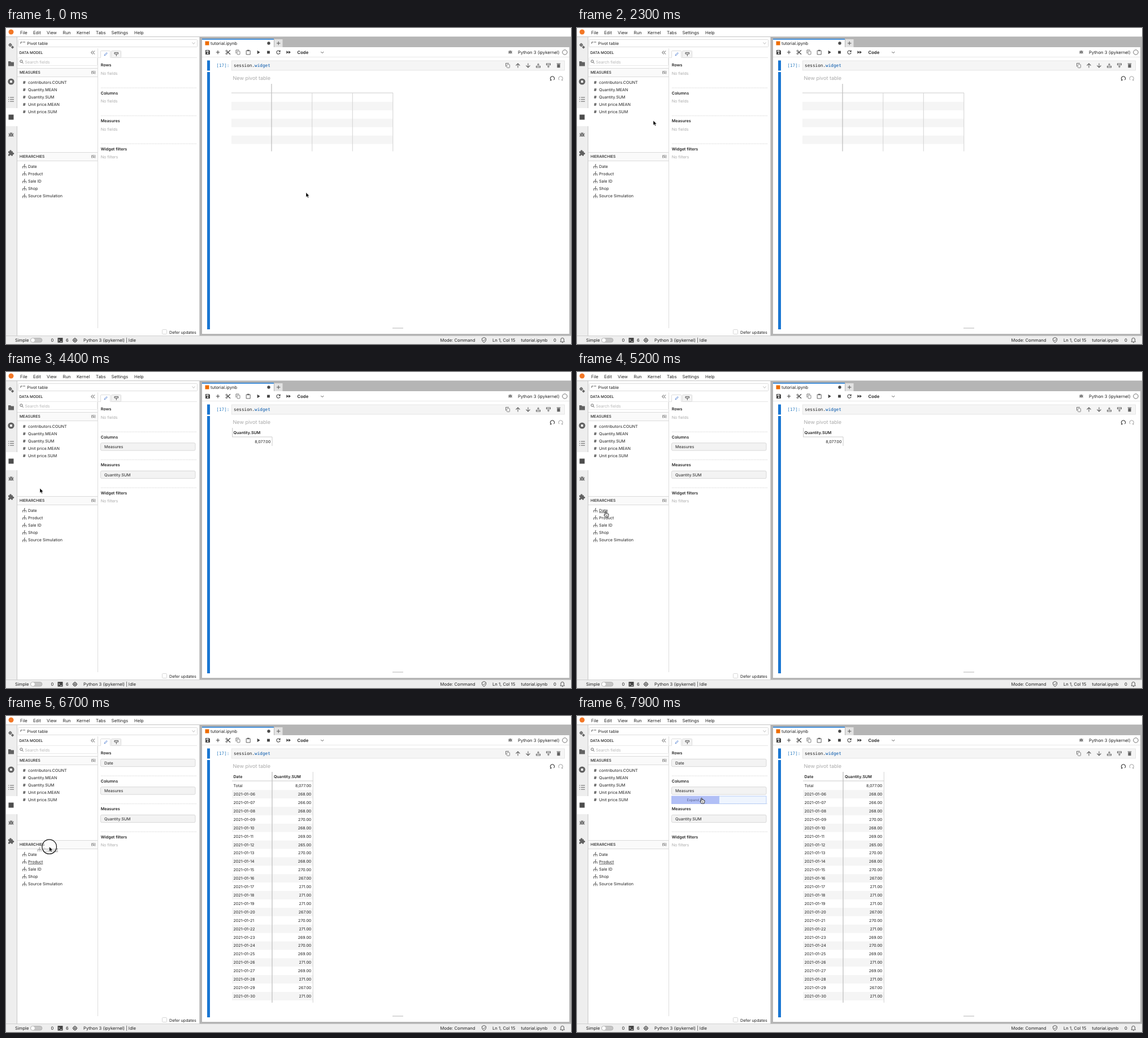
These frames come from a looping animation (1000 by 560 pixels, 8 s). An HTML page:

```html
<!DOCTYPE html>
<html lang="en">
<head>
<meta charset="utf-8">
<title>Pivot table</title>
<style>
html, body { margin: 0; width: 100%; height: 100%; overflow: hidden; background: #fff; }
svg { display: block; width: 100vw; height: 100vh; font-family: Inter, sans-serif; text-rendering: geometricPrecision; }
.mono { font-family: "DejaVu Sans Mono", monospace; }
.hover { text-decoration: underline; }
</style>
</head>
<body>
<svg id="stage" viewBox="0 0 1000 560"></svg>
<script>
const STEP = 100, LOOP = 8000;
const INK = '#212121', GREY = '#616161', PALE = '#aaa', LINE = '#d4d4d4', BLUE = '#1976d2';

// Markup helpers; text is placed by its vertical middle
const text = (x, y, s, size = 7.15, fill = INK, more = '') =>
  `<text x="${x}" y="${y + size * .36}" font-size="${size}" fill="${fill}" ${more}>${s}</text>`;
const bold = (x, y, s, size = 7.1) => text(x, y, s, size, INK, 'font-weight="600"');
const rect = (x, y, w, h, fill, more = '') =>
  `<rect x="${x}" y="${y}" width="${w}" height="${h}" fill="${fill}" ${more}/>`;
const box = (x, y, w, h, fill = '#fff', stroke = LINE, r = 1) =>
  rect(x + .5, y + .5, w - 1, h - 1, fill, `stroke="${stroke}" stroke-width=".8" rx="${r}"`);
const line = (d, stroke = GREY, w = 1, more = '') =>
  `<path d="${d}" fill="none" stroke="${stroke}" stroke-width="${w}" ${more}/>`;
const fill = (d, color = GREY) => `<path d="${d}" fill="${color}"/>`;
const disc = (x, y, r, color, more = '') => `<circle cx="${x}" cy="${y}" r="${r}" fill="${color}" ${more}/>`;
const ring = (x, y, r, color = GREY, w = 1) => disc(x, y, r, 'none', `stroke="${color}" stroke-width="${w}"`);
const at = (x, y, s) => `<g transform="translate(${x} ${y})">${s}</g>`;
const group = (id, s) => `<g id="${id}">${s}</g>`;

// Icons, drawn around 0,0
const gear = r => ring(0, 0, r, GREY, 1.3) + line(`M${-r - 1.3} 0H${r + 1.3}M0 ${-r - 1.3}V${r + 1.3}`, GREY, .8);
const bug = s => `<g transform="scale(${s})">` + disc(0, 0, 2.6, GREY) +
  line('M-4 -2.5 4 2.5M-4 2.5 4 -2.5M-4 0H4M-1.5 -4 0 -2 1.5 -4', GREY, 1) + line('M-1 -.7H1M-1 .8H1', '#fff', .7) + '</g>';
const copy = box(-2, -2.5, 6, 7, '#fff', GREY) + line('M-3.5 2V-4H2', GREY, .9);
const tree = line('M.5 3.5V0H6.5V3.5M3.5 3.5V-3.5H5', '#444', .8);
const arrowUp = line('M0 4V-3.5M-3.5 0 0 -3.5 3.5 0', GREY, 1.1);
const insert = rect(-3.5, 1, 7, 2.5, 'none', `stroke="${GREY}"`) + line('M0 0V-4M-2 -2H2', GREY, .9);
const reload = c => line('M2.5 3A3.6 3.6 0 1 0 -2.5 3', c, 1.1) + fill('M-4.5 4.2H-1.6V1.4Z', c);

const measures = ['contributors.COUNT', 'Quantity.MEAN', 'Quantity.SUM', 'Unit price.MEAN', 'Unit price.SUM'];
const hierarchies = ['Date', 'Product', 'Sale ID', 'Shop', 'Source Simulation'];
const items = [...measures.map((name, i) => ({ name, y: 96.2 + i * 13.1 })),
  ...hierarchies.map((name, i) => ({ name, y: 245.2 + i * 13.15, tree: true }))];

function menuAndSidebar() {
  const menu = [[25, 'File'], [48, 'Edit'], [72, 'View'], [100.5, 'Run'], [125, 'Kernel'], [159, 'Tabs'], [186.5, 'Settings'], [227, 'Help']];
  return disc(9, 7, 4.5, '#f37726') + menu.map(([x, s]) => text(x, 8, s, 7.7)).join('') +
    rect(0, 15, 1000, 1, '#c4c4c4') +
    rect(0, 16, 19, 530, '#eee') + rect(19, 16, 1, 530, '#c8c8c8') + rect(0, 142, 20, 32, '#fff') +
    at(7.5, 30, gear(2)) + at(11.5, 34, gear(1.3)) +
    fill('M4 59H8L9.3 60.5H14V67.5H4Z') +
    disc(9, 95, 5.6, GREY) + rect(7, 93, 4, 4, '#eee') +
    line('M7 123H14M7 126.5H14M7 130H14M4 123H5.5M4 126.5H5.5M4 130H5.5', GREY, 1.2) +
    rect(4.5, 153.5, 9, 9, '#4d4d4d') +
    at(9, 189.5, bug(1.1)) +
    rect(4, 218.5, 8, 8, GREY) + disc(8, 218, 1.8, GREY) + disc(12.5, 222.5, 1.8, GREY) + disc(4.3, 222.5, 1.2, '#eee') + disc(8, 226.3, 1.2, '#eee');
}

function fieldPanel() {
  const header = (y, s) => rect(20, y, 142, 15, '#fafafa') + line(`M20 ${y + .5}H162M20 ${y + 15.5}H162`, LINE, .8) +
    text(24, y + 8, s, 6.7, INK, 'font-weight="500"') + text(150.5, y + 8, '(5)', 6.2);
  const sections = ['Rows', 'Columns', 'Measures', 'Widget filters'];
  return box(21, 20, 318, 14) + line('M26 28V25H29M30 25H34', GREY, 1) + text(37.5, 27.2, 'Pivot table', 7.35) +
    line('M329.5 25.5 332 28.5 334.5 25.5', PALE, .8) +
    text(23.5, 43.5, 'DATA MODEL', 6.5, INK, 'font-weight="500"') +
    line('M153.5 40.5 150.8 43.5 153.5 46.5M156.8 40.5 154.1 43.5 156.8 46.5', '#333', .9) +
    box(21, 52, 141, 15, '#fff', '#e4e4e4') + ring(27, 59, 2.2, '#555', .9) + line('M28.6 60.7 30.6 62.8', '#555') +
    text(33.5, 60, 'Search fields', 7.15, '#b5b5b5') +
    line('M162.5 36V532', '#ddd') + header(71, 'MEASURES') + header(220, 'HIERARCHIES') +
    items.map(o => (o.tree ? at(29, o.y, tree) : text(30, o.y, '#', 7.2, INK, 'font-weight="600"')) +
      text(39, o.y, o.name, 7.15, INK, 'class="item"')).join('') +
    line('M163 52.5H338', '#e0e0e0', .8) + box(167, 40, 18, 13) + rect(168, 52, 16, 1.2, '#fff') + box(186, 40, 18, 13, '#f3f3f3') +
    line('M174 49 174.6 47 178 43.5 179.2 44.7 175.8 48.4Z', '#4a7ad0', .8) +
    line('M192 43.5H198.5V46H192ZM195.3 46V50', '#555', 1) +
    sections.map((s, i) => bold(167.7, 65.8 + i * 49.5, s) +
      (i ? line(`M168 ${56.6 + i * 49.5}H338`, '#d0d0d0', .8, 'stroke-dasharray="1.5 1"') : '')).join('') +
    text(167.7, 228.7, 'No filters', 7.1, PALE) +
    box(276, 534, 9, 9, '#fff', '#ccc') + text(289, 539.4, 'Defer updates', 7.15);
}

function notebook() {
  const icon = (x, s) => at(x, 43, s), cell = (x, s) => at(x, 66.5, s);
  return rect(342, 16, 658, 530, '#b5b5b5') + rect(342, 16, 1, 530, '#d0d0d0') + rect(347, 34, 650, 508, '#fff') +
    rect(347, 19, 127, 16, '#fff') + rect(347, 19, 127, 1.6, BLUE) + rect(475, 20, 14.5, 14, '#e3e3e3') +
    rect(352.5, 23.5, 7, 7, '#ef6c00') + text(362, 27.2, 'tutorial.ipynb', 7.7) + disc(465, 27, 2.7, '#4a4a4a') +
    line('M479 27H485.5M482.2 23.8V30.2', '#555') + rect(347, 51, 650, .8, '#e2e2e2') +
    icon(357, fill('M-4 -4H2.5L4 -2.5V4H-4Z', '#444') + rect(-2.5, -3, 4, 2, '#fff') + disc(0, 1.5, 1.3, '#fff')) +
    icon(375, line('M-3.2 0H3.2M0 -3.2V3.2', '#444', 1.1)) +
    icon(393, ring(-2.6, -2.4, 1.3, '#444') + ring(-2.6, 2.4, 1.3, '#444') + line('M-1.7 -1.5 4 3.7M-1.7 1.5 4 -3.7', '#444', 1.2)) +
    icon(410.5, copy) +
    icon(428.7, line('M-3.5 -3H3.5V4H-3.5Z', GREY) + rect(-1.8, -4.3, 3.6, 2.4, GREY)) +
    icon(446.7, fill('M-2 -3.2 3 0-2 3.2Z', '#444')) + icon(464.5, rect(-2.4, -2.4, 4.8, 4.8, '#444')) +
    icon(482, line('M2.2 -2.2A3.1 3.1 0 1 0 3.1 .8', '#444', 1.1) + fill('M3.7 -4V-.5H.2Z', '#444')) +
    icon(500, fill('M-3.6 -2.7 .2 0-3.6 2.7ZM.2 -2.7 4 0 .2 2.7Z', '#444')) +
    bold(515.5, 43.2, 'Code', 7.7) + line('M557.3 42 559.8 44.5 562.3 42', '#444', .9) +
    icon(892.5, bug(.85)) + text(906, 43.2, 'Python 3 (ipykernel)', 7.7) + ring(989, 43, 4.2, GREY, .9) +
    rect(356, 57.5, 5, 18, BLUE) + rect(356, 78, 5, 456, BLUE, 'id="bar"') +
    text(372.3, 66.7, '[17]:', 7.7, '#307fc1', 'class="mono"') + box(399, 57.5, 590, 18, '#f5f5f5', '#e0e0e0', 0) +
    text(403, 66.5, 'session.<tspan fill="#0055aa">widget</tspan>', 7.7, INK, 'class="mono"') +
    cell(888, copy) + cell(906, arrowUp) + cell(924, `<g transform="scale(1 -1)">${arrowUp}</g>`) +
    cell(942, insert) + cell(960, `<g transform="scale(1 -1)">${insert}</g>`) +
    cell(978, rect(-2.6, -2.2, 5.2, 6, GREY) + rect(-3.3, -3.9, 6.6, 1.1, GREY)) +
    text(401.5, 88.8, 'New pivot table', 9.05, PALE) +
    at(967, 89, reload('#333')) + at(981.7, 89, `<g transform="scale(-1 1)">${reload('#aaa')}</g>`) +
    rect(684, 531, 19, 1.6, '#d0d0d0');
}

function statusBar() {
  return rect(0, 545.5, 1000, 14.5, '#eee') + rect(0, 545, 1000, .8, '#c8c8c8') + text(16, 553, 'Simple', 7.65) +
    box(43, 549, 21.5, 8.5, '#c4c4c4', '#aaa', 4) + disc(47.5, 553.2, 3.8, '#fff', 'stroke="#aaa" stroke-width=".6"') +
    text(79.5, 553, '0', 7.65) + rect(91.5, 549, 9, 8.5, '#444') + line('M93 551.5 95 553.2 93 555M96 555.5H99', '#fff', .8) +
    text(106, 553, '6', 7.65) + at(122, 553.2, ring(0, 0, 3, '#444', 1.1) + rect(-1.2, -1.2, 2.4, 2.4, '#444') + line('M-4.4 0H-3M3 0H4.4M0 -4.4V-3M0 3V4.4', '#444')) +
    text(137, 553, 'Python 3 (ipykernel) | Idle', 7.65) + text(768.5, 553, 'Mode: Command', 7.65) +
    line('M846 548.5 849.5 550V553Q849 556 846 557.5 843 556 842.5 553V550ZM844.3 553 845.6 554.3 848 551.6', '#444', .9) +
    text(861, 553, 'Ln 1, Col 15', 7.65) + text(911.5, 553, 'tutorial.ipynb', 7.65) + text(969, 553, '0', 7.65) +
    line('M981 556H988.5L987.5 554.5V552A2.7 2.7 0 0 0 982 552V554.5ZM984 557.5H985.8', '#444', .9);
}

const chip = (y, s) => box(167, y - 7.2, 168.5, 14.4, '#f3f3f3', '#d0d0d0', 2) + text(174, y, s);
const none = y => text(167.7, y, 'No fields', 7.1, PALE);
const right = 'text-anchor="end"';
const PITCH = 14.91;

function emptyTable() {
  return [1, 3, 5].map(i => rect(399, 116 + i * PITCH, 286, PITCH, '#f5f5f5')).join('') +
    line('M399 115H685', '#ccc') + line('M470 99V218.5', '#c4c4c4', 1.4) +
    line('M541.8 115V218.5M613.3 115V218.5M684.8 115V218.5', '#d2d2d2');
}

function dateTable() {
  const sums = [...'3135340535266625645464626'].map(d => 265 + +d);
  return sums.map((n, i) => {
    const y = 123.6 + (i + 1) * PITCH;
    return (i % 2 ? '' : rect(400, y - 7.4, 143, PITCH, '#f5f5f5')) +
      text(402.5, y, `2021-01-${String(i + 6).padStart(2, '0')}`, 7.05) + text(540.3, y, `${n}.00`, 7.05, INK, right);
  }).join('') + bold(402.5, 107.3, 'Date') + bold(474, 107.3, 'Quantity.SUM') +
    text(402.5, 123.6, 'Total', 7.05) + text(540.3, 123.6, '8,077.00', 7.05, INK, right) +
    line('M400 115H543.5', '#ccc') + line('M471 99V508', '#c4c4c4', 1.4) + line('M543.3 99V508', '#d2d2d2');
}

const stage = document.getElementById('stage');
stage.innerHTML = rect(0, 0, 1000, 560, '#fff') + menuAndSidebar() + fieldPanel() + notebook() + statusBar() +
  group('noRows', none(80)) + group('rowChip', chip(83, 'Date')) +
  group('noMeasure', none(129.5) + none(179)) + group('measureChips', chip(132.4, 'Measures') + chip(182, 'Quantity.SUM')) +
  group('empty', emptyTable()) +
  group('caret', line('M400.8 99V115', '#c4c4c4')) +
  group('single', bold(402.5, 107.3, 'Quantity.SUM') + text(468.5, 123.6, '8,077.00', 7.05, INK, right) +
    line('M400.8 99V115', '#c4c4c4') + line('M400 115H471M471 115V131', '#ccc')) +
  group('dates', dateTable()) +
  group('drop', rect(167, 141.5, 85, 14.5, '#b1bff6') + box(251, 141.5, 84.5, 14.5, '#eff5fe', '#a9c4f5', 0) +
    text(194.5, 148.9, 'Expand all', 6.1, '#5c6792')) +
  group('cursor',
    group('ghost', `<g opacity=".65">${at(-21, 5, tree)}${text(-11, 5, 'Product', 7.15, INK, 'class="hover"')}</g>`) +
    group('press', '<circle id="halo" fill="#fff" fill-opacity=".35" stroke="#111" stroke-width="1.2"/>') +
    group('arrow', '<path d="M0 0V8.3L1.9 6.6 3.2 9.4 4.6 8.8 3.4 6.1H5.9Z" fill="#000" stroke="#fff" stroke-width=".5"/>') +
    group('denied', disc(5.5, 13, 4.6, '#f2f2f2', 'stroke="#999" stroke-width="1.2"') + line('M2.4 9.9 8.6 16.1', '#999', 1.2)) +
    group('hand', '<path d="M-.9 .8Q0 -.4 .8 .8V4L1.6 3.5 2.6 4 3.6 3.8 4.3 4.4 5.3 4.6V7.4L4.4 10H-.2L-2.7 6.6Q-2.8 5.2 -.9 6.3Z" fill="#fff" stroke="#111" stroke-width=".9"/>' +
      line('M1.2 6V8.5M2.7 6V8.5', '#111', .6)));

const $ = id => document.getElementById(id);
const show = (id, on) => $(id).style.display = on ? '' : 'none';
const labels = [...document.querySelectorAll('.item')];
const ends = labels.map(n => 39 + n.getComputedTextLength());

// Pointer path: time, x, y
const path = [[0, 531, 291.5], [200, 531, 291.5], [500, 532, 294], [1100, 532, 294], [1300, 465, 268], [1500, 275, 212],
  [1600, 212, 193.5], [1800, 206.5, 191], [1900, 206.5, 191], [2300, 135, 164], [2800, 75.5, 125], [3800, 75.5, 125],
  [4100, 70, 155], [4400, 60, 206], [4700, 50, 237.5], [4900, 50.5, 247], [5800, 50.5, 247], [6100, 51, 253.5],
  [6600, 51, 253.5], [6900, 128, 188], [7100, 168.5, 152.3], [7300, 203, 147], [7500, 220.5, 145], [8000, 220.5, 145]];

function pointer(t) {
  const i = path.findIndex(k => k[0] > t), [a, ax, ay] = path[i - 1], [b, bx, by] = path[i];
  const p = (t - a) / (b - a);
  return [ax + (bx - ax) * p, ay + (by - ay) * p];
}

function draw(now) {
  const t = Math.floor(now % LOOP / STEP) * STEP;
  const within = (a, b) => t >= a && t < b;
  const [x, y] = pointer(t);
  const pressed = within(6400, 7700);
  const over = t >= 6400 ? 6 : items.findIndex((o, i) => Math.abs(y - o.y) < 6.5 && x > 38 && x < ends[i]);
  labels.forEach((n, i) => n.classList.toggle('hover', i === over));

  show('noRows', t < 5300);
  show('rowChip', t >= 5300);
  show('noMeasure', t < 3300);
  show('measureChips', t >= 3300);
  show('empty', t < 3300);
  show('caret', within(3300, 3400));
  show('single', within(3400, 5400));
  show('dates', t >= 5400);
  show('drop', t >= 7000);
  $('bar').setAttribute('fill', within(1500, 1700) ? '#0d47a1' : BLUE);

  const hand = t >= 7800 || over >= 0 && t < 6400;
  show('hand', hand);
  show('arrow', !hand);
  show('denied', within(1500, 1700));
  show('ghost', within(6400, 7600));
  show('press', pressed);
  $('halo').setAttribute('r', t === 6400 || t === 7600 ? 16 : 12.8);
  $('press').setAttribute('opacity', t === 6400 || t === 7600 ? .5 : 1);
  $('cursor').setAttribute('transform', `translate(${x} ${y})`);
}

const start = performance.now();
function tick() {
  draw(performance.now() - start);
  requestAnimationFrame(tick);
}
tick();
</script>
</body>
</html>
```
